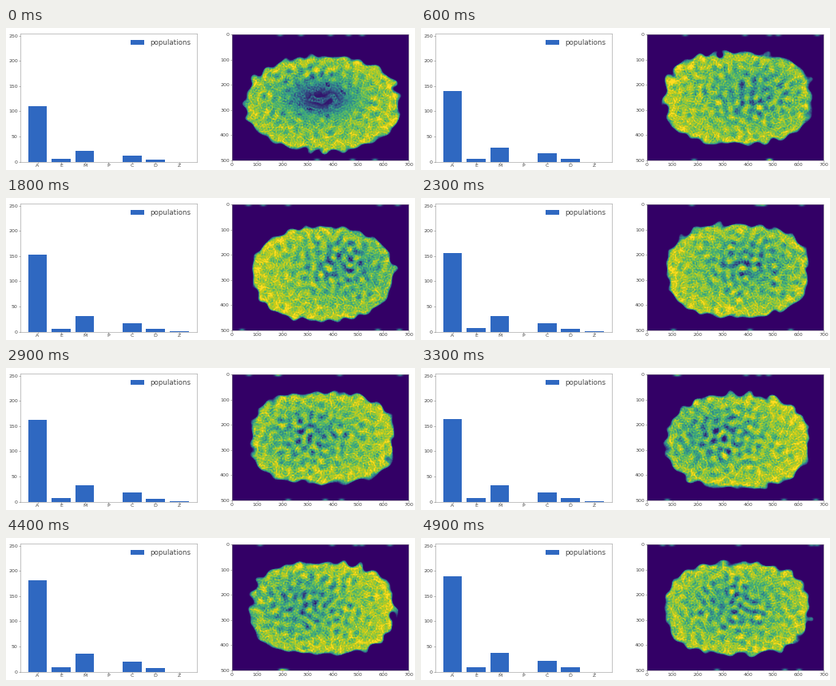
Animation of 512x178 px, one loop 5 s. Source, as a matplotlib script:

```python
import numpy as np
import matplotlib.pyplot as plt
from matplotlib.animation import FuncAnimation
from matplotlib.colors import LinearSegmentedColormap

WIDTH, HEIGHT = 512, 178
FRAMES, INTERVAL = 50, 100
GRID_W, GRID_H = 221, 158
BLUE = "#2f68c1"
GREY = "#484848"

plt.rcParams.update({
    "font.family": "DejaVu Sans", "font.size": 6.2, "text.color": GREY,
    "axes.linewidth": 0.5, "axes.edgecolor": "#888888",
    "xtick.labelcolor": GREY, "ytick.labelcolor": GREY,
    "xtick.color": "#666666", "ytick.color": "#666666",
    "xtick.major.size": 1.6, "ytick.major.size": 1.6,
    "xtick.major.width": 0.5, "ytick.major.width": 0.5,
    "xtick.major.pad": 1.4, "ytick.major.pad": 1.6,
})

TISSUE = LinearSegmentedColormap.from_list("tissue", [
    "#330066", "#333377", "#33668c", "#339988",
    "#4fb56c", "#93c83a", "#cccc18", "#ffdd22"])

# Each group's size relative to group A
SHARES = {"A": 1, "E": 0.042, "M": 0.2, "P": 0, "C": 0.11, "D": 0.04, "Z": 0}

ys, xs = np.mgrid[0:GRID_H, 0:GRID_W]


def counts(frame):
    largest = np.interp(frame, [0, 6, 18, 37, 49], [110, 141, 153, 168, 190])
    sizes = np.array(list(SHARES.values())) * largest
    sizes[-1] = 0.7 * np.sin(np.pi * frame / (FRAMES - 1))
    return np.round(sizes)


def bump(x, y, width, height):
    return np.exp(-((xs - x) / width) ** 2 - ((ys - y) / height) ** 2)


def flowing_noise(seed, wavelength, speed):
    """Return a function of the frame giving smooth band-limited noise."""
    rng = np.random.default_rng(seed)
    shape = xs.shape
    k = np.hypot(np.fft.fftfreq(GRID_H)[:, None], np.fft.fftfreq(GRID_W))
    band = np.exp(-((k * wavelength - 1) / 0.35) ** 2)
    spectrum = band * (rng.normal(size=shape) + 1j * rng.normal(size=shape))
    drift = speed * rng.normal(size=shape)

    def sample(frame):
        field = np.fft.ifft2(spectrum * np.exp(1j * drift * frame)).real
        return field / field.std()
    return sample


lobes = flowing_noise(1, 20, 0.2)
blotches = flowing_noise(2, 13, 0.25)
membranes = flowing_noise(3, 15, 0.25)
grain = flowing_noise(4, 3.5, 0.8)


def depth_inside(frame, sway):
    """Approximate distance in pixels from the lumpy outline, inside positive."""
    young = np.exp(-frame / 6)
    dx = xs - 113
    dy = ys - (82.5 + 4 * sway)
    power = 2.5 - 0.3 * sway
    rho = (np.abs(dx / (89 + 7 * young)) ** power
           + np.abs(dy / (58 + 1.5 * sway)) ** power) ** (1 / power)
    radius = np.hypot(dx, dy) / np.maximum(rho, 0.05)
    return (1 - rho) * radius + 1.8 * lobes(frame)


def edge_spots(frame):
    """Faint spots along the top and bottom borders."""
    rng = np.random.default_rng(300 + frame // 3)
    return sum(0.42 * bump(x, border, 3.5, 1.8)
               for border, amount in ((0, 5), (GRID_H - 1, 3))
               for x in rng.uniform(8, GRID_W - 8, amount))


def tissue(frame):
    sway = np.cos(2 * np.pi * (frame + 1) / 19)
    shift = np.sin(2 * np.pi * (frame - 2) / 48)
    openness = max(0, 1 - frame / 6)
    inside = depth_inside(frame, sway)
    blotch = blotches(frame)

    # A dim core wanders sideways while the opposite flank brightens
    dim = bump(112 + 25 * shift, 74, 50, 34)
    rim = np.exp(-(inside / 14) ** 2)
    level = 0.66 - 0.2 * dim + 0.12 * rim - 0.1 * shift * (xs - 112) / 90
    ridge = np.exp(-(membranes(frame) / 0.28) ** 2)
    value = (level + (0.07 + 0.09 * dim) * blotch
             + (0.2 - 0.12 * dim) * ridge + 0.055 * grain(frame))
    hollow = openness * bump(112, 80, 36, 19)
    value *= 1 - hollow * np.clip(0.75 + 0.6 * blotch, 0, 1)

    halo = np.clip((inside + 1) / 6, 0, 1)
    value = np.maximum(value, 0.06) * halo * (2 - halo)
    return np.clip(value + edge_spots(frame), 0, 1)


def add_axes(left, top, right, bottom):
    return fig.add_axes([left / WIDTH, 1 - bottom / HEIGHT,
                         (right - left) / WIDTH, (bottom - top) / HEIGHT])


fig = plt.figure(figsize=(WIDTH / 72, HEIGHT / 72), dpi=72, facecolor="white")

bar_ax = add_axes(18, 6.5, 239, 167.5)
bars = bar_ax.bar(list(SHARES), counts(0), color=BLUE, label="populations")
bar_ax.set_xlim(-0.73, 6.75)
bar_ax.set_ylim(0, 255.5)
bar_ax.set_yticks(range(0, 251, 50))
bar_ax.legend(loc="upper right", frameon=False, fontsize=8.7)

image_ax = add_axes(283, 8, 504, 166)
image = image_ax.imshow(tissue(0), cmap=TISSUE, vmin=0, vmax=1, aspect="auto",
                        extent=(0, 700, 500, 0), interpolation="nearest")
image_ax.set_xticks(range(0, 701, 100))
image_ax.set_yticks(range(0, 501, 100))


def update(frame):
    for bar, count in zip(bars, counts(frame)):
        bar.set_height(count)
    image.set_data(tissue(frame))
    return [*bars, image]


animation = FuncAnimation(fig, update, frames=FRAMES, interval=INTERVAL,
                          repeat=True, repeat_delay=0, blit=False)
plt.show()
```
